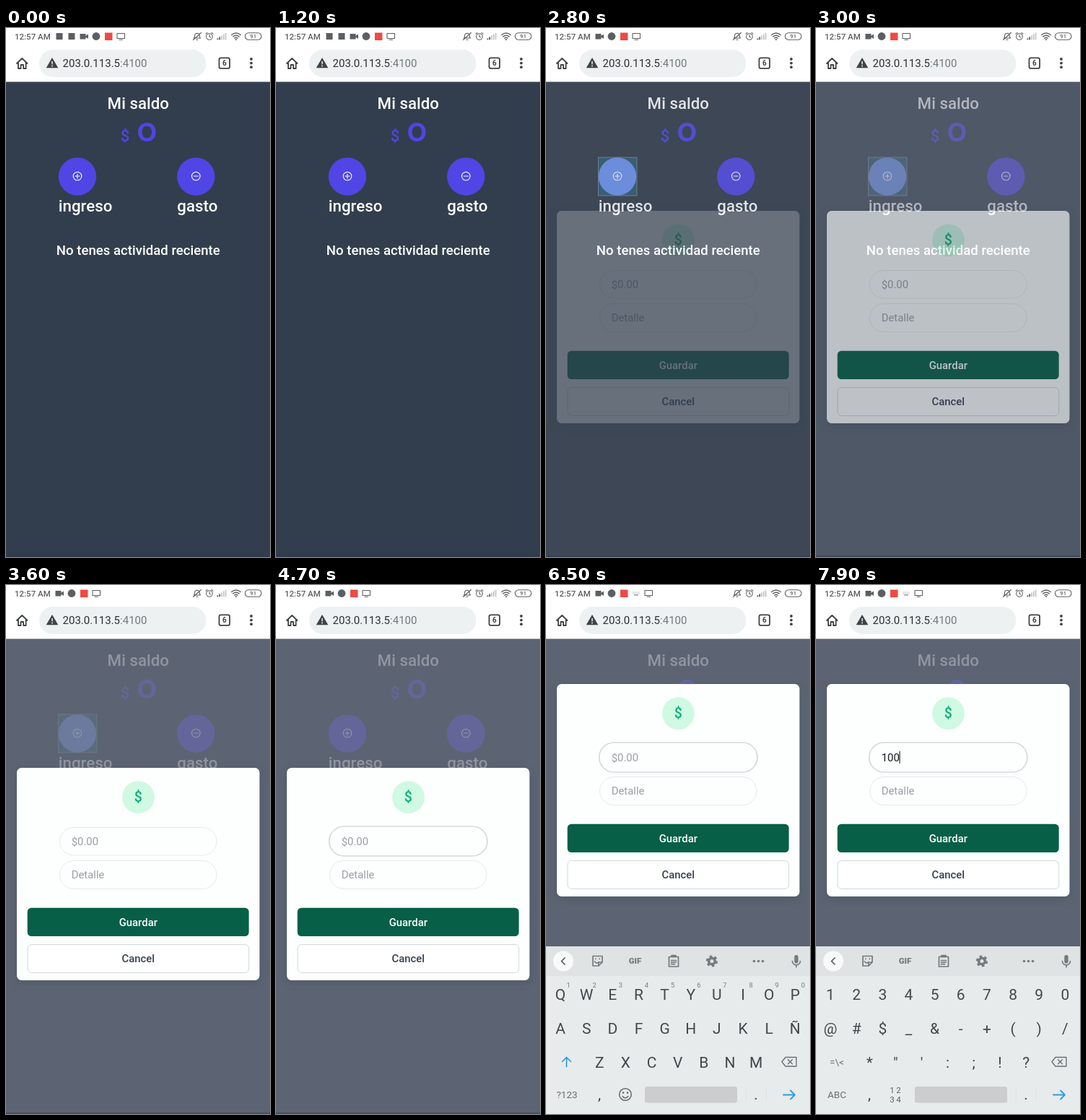
These frames come from a looping animation (366x732 px, 8 s). An HTML page:

```html
<!DOCTYPE html>
<html lang="es">
<head>
<meta charset="utf-8">
<title>Mi saldo</title>
<style>
html, body { margin: 0; width: 100%; height: 100%; overflow: hidden; background: #323e4d; }
svg { display: block; width: 366px; height: 732px; font-family: Roboto, "Liberation Sans", sans-serif; }
.m { font-weight: 500; }
.c { text-anchor: middle; }
.h { font-size: 22.3px; }
.b { font-size: 14.9px; }
.line { fill: none; stroke-linecap: round; stroke-linejoin: round; }
.accent { fill: #4f46e5; }
.hint { fill: #9b9fa6; }
.key { font-size: 21px; fill: #43474a; }
.small { font-size: 13.5px; fill: #6c7073; }

/* one loop is 8 s, so 1% is 80 ms */
.step { animation: 8s step-end infinite; }
.smooth { animation: 8s linear infinite; }

.tap { animation-name: tap; }
@keyframes tap { 0% { visibility: hidden } 31.25% { visibility: visible } 50% { visibility: hidden } }

.launchers { animation-name: launchers; }
@keyframes launchers { 0% { visibility: visible } 35% { visibility: hidden } }
.tray { animation-name: tray; }
@keyframes tray { 0% { transform: translateX(34px) } 35% { transform: none } }
.screen { animation-name: screen; }
@keyframes screen { 0% { transform: none } 68.75% { transform: translateX(17px) } }
.kbIcon { animation-name: kbIcon; }
@keyframes kbIcon { 0% { visibility: hidden } 68.75% { visibility: visible } }

.fade { animation-name: fade; }
@keyframes fade {
  0% { opacity: 0 }
  33.75% { opacity: 0; animation-timing-function: ease-out }
  41.25%, 100% { opacity: 1 }
}
.lift { animation-name: lift; }
@keyframes lift { 0% { transform: none } 66.25% { transform: translateY(-116px) } }

.focus { animation-name: focus; }
@keyframes focus { 0% { visibility: hidden } 56.25% { visibility: visible } }
.blur { animation-name: blur; }
@keyframes blur { 0% { visibility: visible } 56.25% { visibility: hidden } }

.keyboard { animation-name: keyboard; }
@keyframes keyboard {
  0% { transform: translateY(232px) }
  62.5% { transform: translateY(232px); animation-timing-function: ease-out }
  66.25%, 100% { transform: none }
}
.letters { animation-name: letters; }
@keyframes letters { 0% { visibility: visible } 86.25% { visibility: hidden } }
.symbols { animation-name: symbols; }
@keyframes symbols { 0% { visibility: hidden } 86.25% { visibility: visible } }

.empty { animation-name: empty; }
@keyframes empty { 0% { visibility: visible } 91.25% { visibility: hidden } }
.d1 { animation-name: d1; }
@keyframes d1 { 0% { visibility: hidden } 91.25% { visibility: visible } }
.d2 { animation-name: d2; }
@keyframes d2 { 0% { visibility: hidden } 95% { visibility: visible } }
.d3 { animation-name: d3; }
@keyframes d3 { 0% { visibility: hidden } 97.5% { visibility: visible } }
.caret { animation-name: caret; }
@keyframes caret {
  0% { visibility: hidden }
  91.25% { visibility: visible; transform: translateX(-16.7px) }
  95% { visibility: visible; transform: translateX(-8.4px) }
  97.5% { visibility: visible; transform: none }
}
</style>
</head>
<body>
<svg viewBox="0 0 366 732">
  <rect width="366" height="732" fill="#323e4d"/>

  <!-- page -->
  <g fill="#fff" class="m">
    <text class="h c" x="183.3" y="111.5">Mi saldo</text>
    <text class="h accent" x="158.7" y="157">$</text>
    <text class="c accent" x="195.3" y="157" style="font:700 36px Inter,sans-serif">O</text>
    <circle class="accent" cx="99" cy="205.5" r="26.2"/>
    <circle class="accent" cx="263.3" cy="205.5" r="26.2"/>
    <g class="step tap">
      <rect x="72.5" y="179" width="53.5" height="53" fill="#2f5a70" stroke="#8b9ba6" stroke-width=".7"/>
      <circle cx="99" cy="205.5" r="26.2" fill="#6b94f2"/>
    </g>
    <g class="line" stroke="#fff" stroke-width="1.1">
      <circle cx="99" cy="205" r="5.8"/>
      <path d="M96 205h6M99 202v6"/>
      <circle cx="263.3" cy="205" r="5.8"/>
      <path d="M260.300 205h6"/>
    </g>
    <text class="h" x="72.800" y="253.500">ingreso</text>
    <text class="h" x="237.300" y="253.500">gasto</text>
    <text class="c" x="183.300" y="313.700" font-size="18.600">No tenes actividad reciente</text>
  </g>

  <!-- dialog -->
  <g class="smooth fade">
    <rect y="74" width="366" height="658" fill="#6b7280" opacity=".75"/>
    <g class="step lift">
      <rect x="15" y="255" width="336.500" height="296" rx="7" fill="#27303c" opacity=".2" style="filter:blur(6px)"/>
      <rect x="15" y="253" width="336.500" height="294" rx="6.500" fill="#fdfefe"/>
      <circle cx="183.500" cy="293.700" r="22.400" fill="#cff9e3"/>
      <text class="m c" x="183.300" y="300" font-size="19.500" fill="#0fae7c">$</text>
      <rect class="line step blur" x="74.500" y="335.500" width="217.500" height="38.500" rx="19.200" stroke="#e7e9ec"/>
      <rect class="line step focus" x="73.700" y="334" width="219.300" height="41" rx="20.500" stroke="#d6d9dc" stroke-width="1.700"/>
      <rect class="line" x="74.500" y="381.500" width="217.500" height="39" rx="19.500" stroke="#e7e9ec"/>
      <text class="b hint step empty" x="90.700" y="359.500">$0.00</text>
      <text class="b" x="90.700" y="359.500" fill="#161b22"><tspan class="step d1">1</tspan><tspan class="step d2">0</tspan><tspan class="step d3">0</tspan></text>
      <rect class="step caret" x="115.500" y="346" width="1.100" height="17" fill="#161b22"/>
      <text class="b hint" x="90.700" y="406">Detalle</text>
      <rect x="29.700" y="446.700" width="307" height="39.300" rx="5.500" fill="#065f46"/>
      <text class="m b c" x="183.300" y="471.500" fill="#fff">Guardar</text>
      <rect x="30" y="497.500" width="306.700" height="39" rx="5.500" fill="#fff" stroke="#d3d7dc"/>
      <text class="m b c" x="183.300" y="522" fill="#374151">Cancel</text>
    </g>
  </g>
  <rect y="730" width="366" height="2" fill="#2b3350" opacity=".45"/>

  <!-- browser bar -->
  <rect width="366" height="74.500" fill="#fff"/>
  <rect x="46" y="30" width="231.500" height="38" rx="19" fill="#eef1f2"/>
  <g class="line" stroke="#3f4346" stroke-width="1.800">
    <path d="M14.500 49.500 22.300 42 30 49.500M17 47.500V56h3.500v-5h3.600v5h3.500v-8.500" stroke-linecap="butt"/>
    <rect x="295.500" y="41.300" width="14.600" height="14.600" rx="2.500"/>
  </g>
  <path d="M64 41 72.300 55.300H55.700Z" fill="#3f4346"/>
  <path d="M64 46v4.300M64 51.600v1.800" stroke="#eef1f2" stroke-width="1.500"/>
  <text x="78.500" y="54" font-size="15.050" fill="#2c3033">203.0.113.5<tspan fill="#73787c">:4100</tspan></text>
  <text class="c" x="302.800" y="52.200" font-size="10" font-weight="700" fill="#3f4346">6</text>
  <g fill="#3f4346"><circle cx="340" cy="43" r="1.900"/><circle cx="340" cy="48.600" r="1.900"/><circle cx="340" cy="54.200" r="1.900"/></g>

  <!-- status bar -->
  <g fill="#5c5f62">
    <text class="m" x="12" y="15.700" font-size="11.500">12:57 AM</text>
    <g class="step launchers">
      <rect x="69.500" y="7" width="9" height="9"/>
      <rect x="86.500" y="7" width="9" height="9"/>
    </g>
    <g class="step tray">
      <path d="M68.500 8h8v2.700l3.500-2.200v6.500l-3.500-2.200V15.500h-8Z"/>
      <circle cx="91" cy="11.500" r="5.400"/>
      <rect x="103" y="6.500" width="10.500" height="10.500" fill="#ee4a43"/>
      <g class="step kbIcon" opacity=".75">
        <path class="line" d="M120.500 10h9M120.500 12h9" stroke="#5c5f62" stroke-width="1.200" stroke-dasharray="1 1.600" style="stroke-linecap:butt"/>
        <path d="M122 13.300h6v1.200h-6Z"/>
      </g>
      <g class="step screen">
        <path class="line" d="M120 7.500h10.500v7H120ZM123 16.300h4.500" stroke="#5c5f62" stroke-width="1.100"/>
      </g>
    </g>
    <g class="line" stroke="#5c5f62" stroke-width="1.100">
      <path d="M260.500 14h9c-1.500-1.500-1-3-1.300-4.500-.5-3-5.900-3-6.400 0-.3 1.500.2 3-1.300 4.500M264 16.300h2M259.500 16.500 270.500 6.500"/>
      <circle cx="282" cy="12" r="4.300"/>
      <path d="M282 9.500V12l1.700 1M277 8.200l2-1.700M287 8.200l-2-1.700"/>
      <rect x="331.500" y="6.800" width="22.500" height="9.400" rx="4.700"/>
    </g>
    <g id="signal"></g>
    <g class="line" stroke="#5c5f62" stroke-width="1.500">
      <path d="M312.800 9.500q6.200-5 12.400 0M314.800 11.800q4.200-3.300 8.400 0M316.900 14q2.100-1.600 4.200 0"/>
    </g>
    <circle cx="319" cy="16" r="1.100"/>
    <text class="m c" x="342.700" y="14.300" font-size="7.700">91</text>
  </g>

  <!-- keyboard -->
  <g class="smooth keyboard">
    <rect y="500" width="366" height="232" fill="#e8ebeb"/>
    <rect y="500" width="366" height="41" fill="#e0e3e4"/>
    <circle cx="24" cy="520.500" r="14" fill="#f8f9f9"/>
    <g class="line" stroke="#55595c" stroke-width="1.700">
      <path d="M26 516l-4.500 4.500L26 525"/>
    </g>
    <g class="line" stroke="#757a7d" stroke-width="1.700">
      <path d="M65 513.500h13V522l-5 5h-8ZM78 522h-5v5M67.500 521q2.500 3.500 5 1"/>
      <path d="M68.800 517.200v.3M74.300 517.200v.3"/>
      <path d="M170.500 514.500h13V528h-13ZM173.500 519.500h7M173.500 522h7M173.500 524.600h5"/>
      <path d="M174.500 513.500h5" stroke-width="3.300"/>
      <circle cx="230" cy="520.500" r="4.300" stroke-width="3.600"/>
      <circle cx="230" cy="520.500" r="6.800" stroke-width="2.600" stroke-dasharray="3.560" style="stroke-linecap:butt"/>
      <path d="M341.500 520.500c0 7 11 7 11 0M347 526v2.700"/>
    </g>
    <text class="c" x="123.500" y="524.300" font-size="11.500" font-weight="900" fill="#757a7d">GIF</text>
    <g fill="#757a7d">
      <circle cx="288.500" cy="520.500" r="1.800"/><circle cx="294.500" cy="520.500" r="1.800"/><circle cx="300.500" cy="520.500" r="1.800"/>
      <rect x="344.300" y="512" width="5.400" height="11.500" rx="2.700"/>
    </g>

    <g class="step letters" id="letters">
      <path class="line" d="M28.500 666.500V654M22.500 659.500l6-6 6 6" stroke="#2a9de0" stroke-width="1.700"/>
      <text class="small c" x="29" y="710">?123</text>
      <g class="line" stroke="#666b6e" stroke-width="1.500">
        <circle cx="110" cy="705" r="8.300"/>
        <path d="M106 707.500q4 4.500 8 0"/>
      </g>
      <circle cx="107" cy="702.600" r="1.300" fill="#666b6e"/><circle cx="113" cy="702.600" r="1.300" fill="#666b6e"/>
    </g>
    <g class="step symbols" id="symbols">
      <text class="small c" x="29" y="664.500">=\&lt;</text>
      <text class="small c" x="29" y="710">ABC</text>
      <g class="c" font-size="11.500" fill="#5c6063" letter-spacing="2.500">
        <text x="111.200" y="703">12</text><text x="111.200" y="716">34</text>
      </g>
    </g>

    <g class="line" stroke="#6c7073" stroke-width="1.400">
      <path d="M332 653.500h15v12.500h-15l-5-6.250ZM335.500 656.700l6 6M341.500 656.700l-6 6"/>
    </g>
    <rect x="137" y="694" width="128" height="22.500" rx="3" fill="#cbcdce"/>
    <path d="M277.500 697v17M305.500 697v17" stroke="#dfe2e2"/>
    <text class="key c" x="74" y="711.500">,</text>
    <text class="key c" x="291" y="711.500">.</text>
    <path class="line" d="M329 705.500h15.500M339 699.500l6 6-6 6" stroke="#2a9de0" stroke-width="1.800"/>
  </g>
</svg>
<script>
const NS = "http://www.w3.org/2000/svg";

function add(parent, tag, attrs, text = "") {
  const node = document.createElementNS(NS, tag);
  for (const name in attrs) node.setAttribute(name, attrs[name]);
  node.textContent = text;
  document.getElementById(parent).append(node);
}

function keyRow(layer, chars, y, x = 20, attrs = { class: "key c" }) {
  [...chars].forEach((ch, i) => add(layer, "text", { ...attrs, x: x + 36.15 * i, y }, ch));
}

keyRow("letters", "QWERTYUIOP", 574);
keyRow("letters", "ASDFGHJKLÑ", 620.5);
keyRow("letters", "ZXCVBNM", 667.5, 74.2);
keyRow("letters", "1234567890", 557, 31, { class: "c", "font-size": 9.3, fill: "#777b7e" });

keyRow("symbols", "1234567890", 574);
keyRow("symbols", "@#$_&-+()/", 620.5);
keyRow("symbols", "*\"':;!?", 667.5, 74.2);

for (let i = 0; i < 5; i++) {
  const height = 2 + 1.9 * i;
  add("signal", "rect", { x: 292.5 + 2.8 * i, y: 16.3 - height, width: 1.8, height, opacity: i < 2 ? 1 : 0.35 });
}
</script>
</body>
</html>
```
